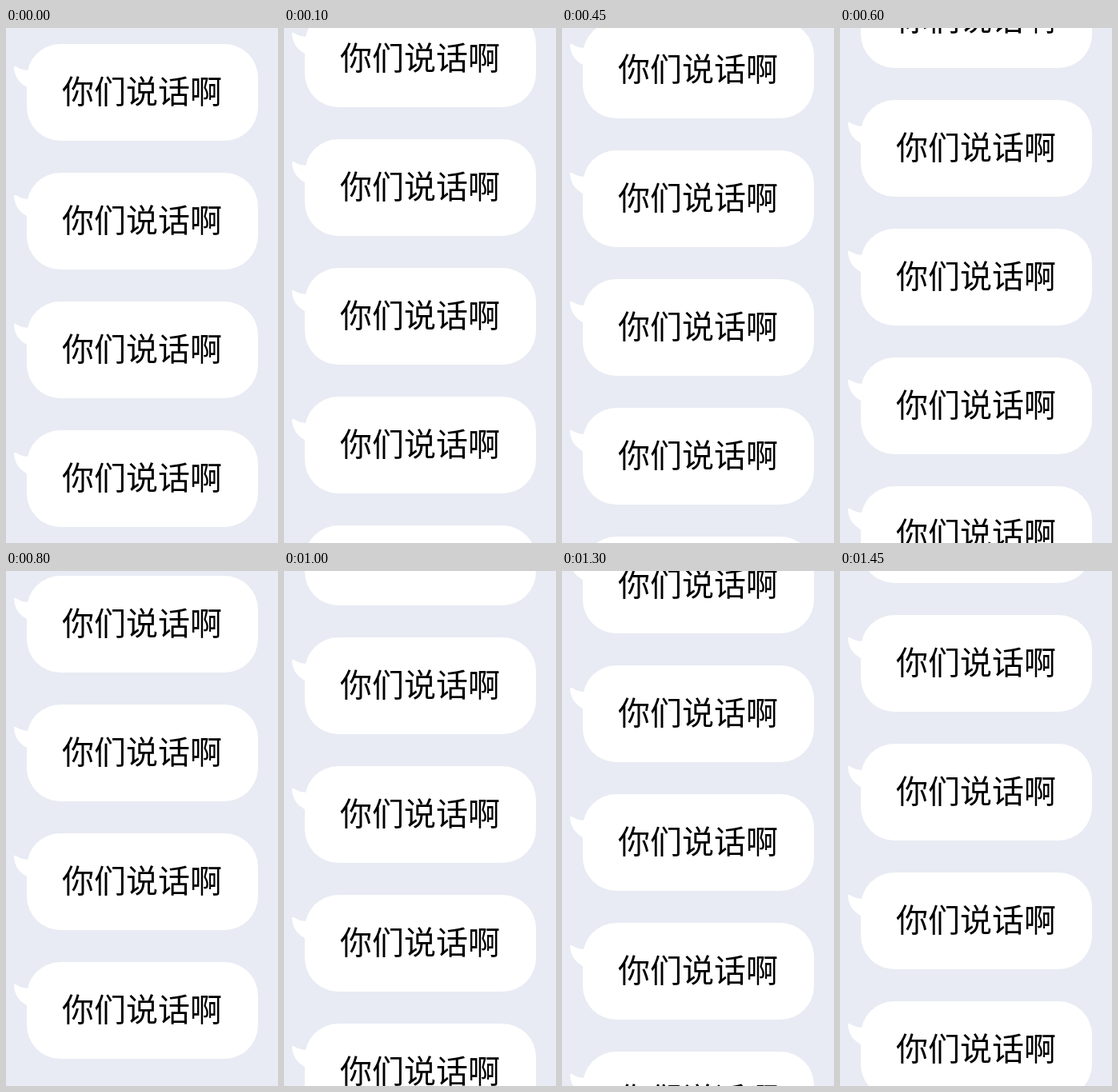
Write an HTML page that moves like this. It is 340 px wide and 644 px high and loops after 1500 ms.

```html
<!DOCTYPE html>
<html lang="zh-CN">
<head>
<meta charset="utf-8">
<style>
  html, body { margin: 0; width: 100%; height: 100%; overflow: hidden; background: #e8ebf3; }
  svg { display: block; }
  text { font: 40px "Noto Sans CJK SC", "Noto Sans CJK", sans-serif; }
</style>
</head>
<body>
<svg width="340" height="644" viewBox="0 0 340 644">
  <defs>
    <g id="bubble">
      <rect x="26" width="289" height="121" rx="42" fill="#fff"/>
      <path d="M10 29Q10 27 13 28.5Q20 33 30 33V56Q11 48 10 29Z" fill="#fff"/>
      <text x="70" y="74">你们说话啊</text>
    </g>
  </defs>
  <g id="list"></g>
</svg>
<script>
  const LOOP = 1500, TICK = 50, STEP = 21, PITCH = 161, START = 20;
  const list = document.getElementById('list');
  for (let i = -1; i < 5; i++) {
    list.innerHTML += `<use href="#bubble" y="${i * PITCH}"/>`;
  }

  function draw(now) {
    const tick = Math.floor((now % LOOP) / TICK);
    const travel = (tick * STEP) % PITCH;
    list.setAttribute('transform', `translate(0 ${START - travel})`);
    requestAnimationFrame(draw);
  }
  draw(performance.now());
</script>
</body>
</html>
```
